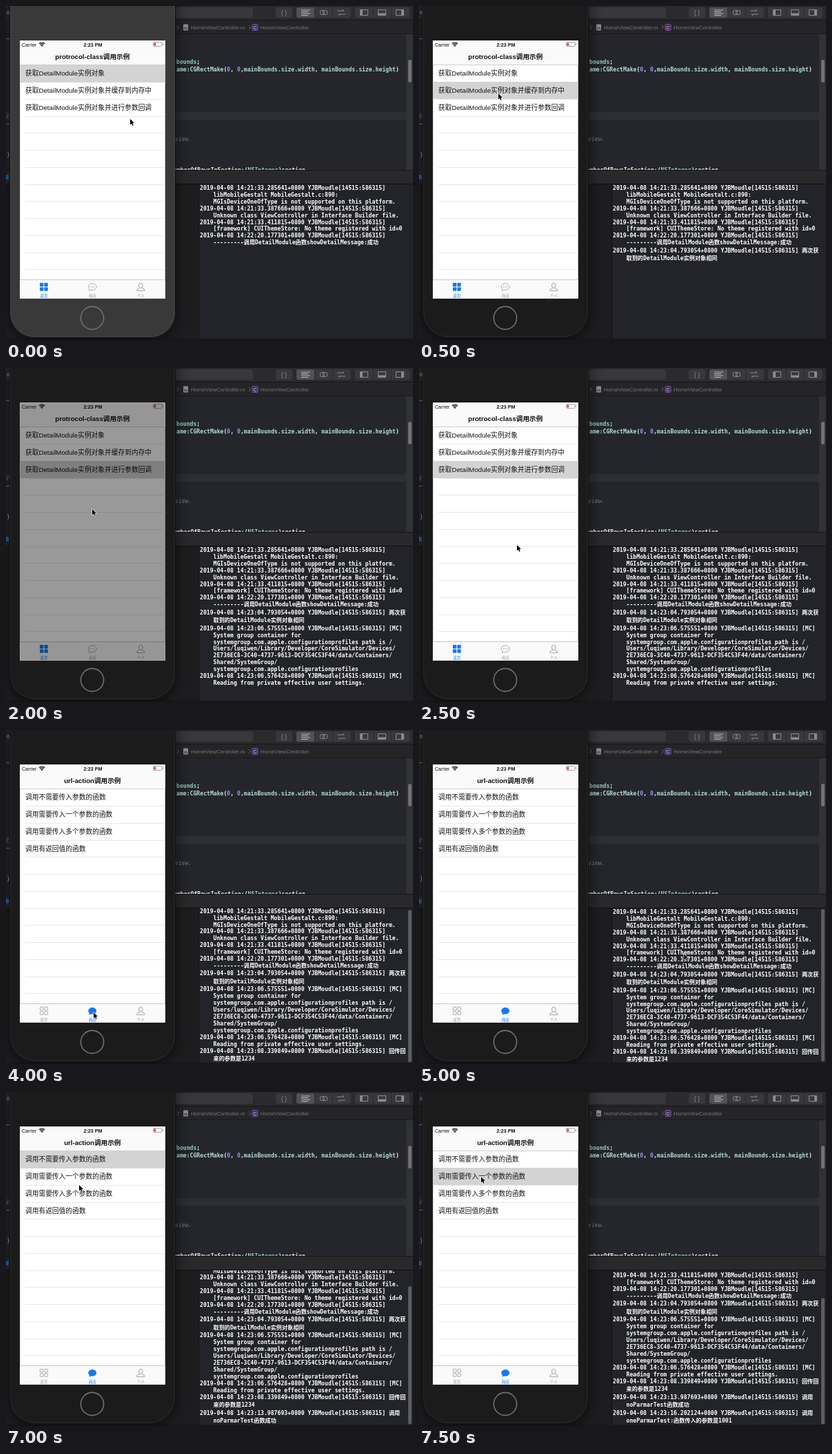
Recreate the animation shown at these times as an HTML page with a canvas. Size 590x485 px, loop 8000 ms.

```html
<!DOCTYPE html>
<html lang="zh-CN">
<head>
<meta charset="utf-8">
<title>Module demo</title>
<style>
html, body { margin: 0; width: 590px; height: 485px; overflow: hidden; background: #1e1e20; }
canvas { display: block; }
</style>
</head>
<body>
<canvas id="stage" width="590" height="485"></canvas>
<script>
const g = document.getElementById('stage').getContext('2d');
const CJK = '"Noto Sans CJK SC", "Noto Sans CJK", ';
const SANS = '"Liberation Sans", ' + CJK + 'sans-serif';
const MONO = '"DejaVu Sans Mono", ' + CJK + 'monospace';
const STEP = 500, LOOP = 8000;
const BLUE = '#1479f5', GREY = '#9a9a9a';

// Console
const stamp = (time, tail = '') => `2019-04-08 14:${time}+0800 YJBMoudle[14515:586315]${tail}`;
const LOG = [
  stamp('21:33.285641'),
  '    libMobileGestalt MobileGestalt.c:890:',
  '    MGIsDeviceOneOfType is not supported on this platform.',
  stamp('21:33.387666'),
  '    Unknown class ViewController in Interface Builder file.',
  stamp('21:33.411815'),
  '    [framework] CUIThemeStore: No theme registered with id=0',
  stamp('22:20.177301'),
  '    ---------调用DetailModule函数showDetailMessage:成功',
  stamp('23:04.793054', ' 两次获'),
  '    取到的DetailModule实例对象相同',
  stamp('23:06.575551', ' [MC]'),
  '    System group container for',
  '    systemgroup.com.apple.configurationprofiles path is /',
  '    Users/luqiwen/Library/Developer/CoreSimulator/Devices/',
  '    2E736EC8-3C40-4737-9613-DCF354C53F44/data/Containers/',
  '    Shared/SystemGroup/',
  '    systemgroup.com.apple.configurationprofiles',
  stamp('23:06.576428', ' [MC]'),
  '    Reading from private effective user settings.',
  stamp('23:08.339849', ' 回传回'),
  '    来的参数是1234',
  stamp('23:13.987693', ' 调用'),
  '    noParmarTest函数成功',
  stamp('23:16.202124', ' 调用'),
  '    oneParmarTest:函数传入的参数是1001'
];

const PAGES = [
  { title: 'protrocol-class调用示例',
    rows: ['获取DetailModule实例对象', '获取DetailModule实例对象并缓存到内存中', '获取DetailModule实例对象并进行参数回调'] },
  { title: 'url-action调用示例',
    rows: ['调用不需要传入参数的函数', '调用需要传入一个参数的函数', '调用需要传入多个参数的函数', '调用有返回值的函数'] }
];

// Each step lists only what changes
const CHANGES = [
  { x: 180, y: 164, page: 0, on: [0], lines: 9, body: '#393939', dim: false, top: false },
  { x: 115, y: 127, on: [1], lines: 11, body: '#1b1b1c' },
  { x: 111, y: 138 },
  { x: 103, y: 148, on: [1, 2] },
  { x: 125, y: 205, on: [2], lines: 20, dim: true },
  { x: 142, y: 257, dim: false },
  { lines: 22 },
  { x: 126, y: 412 },
  { x: 127, y: 410, page: 1, on: [] },
  { x: 386, y: 335 },
  { x: 384, y: 325, top: true },
  { x: 209, y: 202, top: false },
  { x: 122, y: 91, on: [0], lines: 24 },
  { x: 122, y: 101 },
  { x: 106, y: 135 },
  { x: 90, y: 123, on: [1], lines: 26 }
];
const STATES = [];
CHANGES.forEach((c, i) => STATES.push({ ...STATES[i - 1], ...c }));

function box(x, y, w, h, fill) {
  g.fillStyle = fill;
  g.fillRect(x, y, w, h);
}

function round(x, y, w, h, r, fill, stroke, line = 1) {
  g.beginPath();
  g.roundRect(x, y, w, h, r);
  if (fill) { g.fillStyle = fill; g.fill(); }
  if (stroke) { g.strokeStyle = stroke; g.lineWidth = line; g.stroke(); }
}

function path(points, stroke, line = 1) {
  g.beginPath();
  points.forEach(([x, y]) => g.lineTo(x, y));
  g.strokeStyle = stroke;
  g.lineWidth = line;
  g.stroke();
}

function text(str, x, y, font, fill, align = 'left') {
  g.font = font;
  g.fillStyle = fill;
  g.textAlign = align;
  g.fillText(str, x, y);
}

// Runs of [text, colour] set one after another
function code(x, y, runs) {
  for (const [str, fill] of runs) {
    text(str, x, y, 'bold 8.15px ' + MONO, fill);
    x += g.measureText(str).width;
  }
}

function toolbar() {
  const ink = '#8a8a8c', bar = '#2b2b2d', button = '#39393b';
  box(0, 0, 590, 20, bar);
  round(200, 2, 158, 15, 3, '#38383a');
  text('6', 1, 12, '8px ' + SANS, '#a0a0a2');
  round(391, 2, 24, 15, 3, button);
  text('{ }', 403, 12.5, '9px ' + SANS, ink, 'center');
  round(421, 2, 79, 15, 3, button);
  round(421, 2, 26, 15, [3, 0, 0, 3], '#525254');
  round(506, 2, 79, 15, 3, button);
  for (const x of [447, 473, 532, 558]) box(x, 2, 1, 15, bar);
  for (let i = 0; i < 4; i++) box(428, 5.5 + i * 2.5, i % 2 ? 10 : 13, 1, '#b8b8ba');
  g.strokeStyle = ink;
  g.lineWidth = 1;
  for (const x of [458.5, 462.5]) {
    g.beginPath();
    g.arc(x, 9.5, 3.3, 0, 7);
    g.stroke();
  }
  path([[480, 7], [490, 7], [488, 5]], ink);
  path([[492, 12], [482, 12], [484, 14]], ink);
  for (const x of [513.5, 539.5, 565.5]) round(x, 5.5, 11, 8, 0, null, ink);
  box(514, 6, 3, 7, ink);
  box(540, 10.5, 10, 3, ink);
  box(573, 6, 3, 7, ink);
}

function editor() {
  const teal = '#8fcfc0', mint = '#b4ddd3', white = '#ececee', num = '#a08ff5';
  box(0, 20, 590, 1, '#161618');
  box(0, 21, 590, 19, '#252528');
  box(0, 40, 590, 1, '#1a1a1c');
  const crumb = '7.7px ' + SANS, dull = '#77777a';
  for (const x of [248, 352]) path([[x, 28], [x + 2.5, 31], [x, 34]], '#606063');
  round(257, 26.5, 7, 9, 1, '#8e8e91');
  text('m', 260.5, 33.5, 'bold 6px ' + SANS, '#333336', 'center');
  text('HomeViewController.m', 268, 34, crumb, dull);
  round(357, 26.5, 8, 9, 1.5, '#3b2e50', '#7c5cab');
  text('C', 361, 33.7, 'bold 7px ' + SANS, '#b9a3d8', 'center');
  text('HomeViewController', 369, 34, crumb, dull);

  box(0, 41, 580, 198, '#25262b');
  box(0, 154, 580, 11, '#2e2f34');
  box(580, 41, 10, 198, '#313235');
  round(583, 78, 5, 33, 2.5, '#717174');
  code(247, 84, [['bounds', teal], [';', white]]);
  code(247, 95, [
    ['ame:CGRectMake', mint], ['(', white], ['0', num], [', ', white], ['0', num], [',', white],
    ['mainBounds.size.width', mint], [', ', white], ['mainBounds.size.height', mint], [')', white]
  ]);
  text('view.', 245, 196, 'italic 8.15px ' + MONO, '#747c84');
  code(243, 241, [['umberOfRowsInSection:(', white], ['NSInteger', teal], [')section', white]]);

  for (const y of [47, 171]) box(0, y, 5, 1, '#78787b');
  text('r', 0, 163, 'italic 8px ' + MONO, '#77777a');
  text('}', 1, 219, '8px ' + MONO, '#b0b0b2');
}

function debugArea() {
  box(0, 238, 590, 1, '#151517');
  box(0, 239, 590, 19, '#29292b');
  box(0, 258, 590, 1, '#111113');
  round(-4, 245, 8, 7, [0, 3, 3, 0], '#2a62a5');
  box(0, 259, 279, 226, '#1d1d1f');
  box(279, 259, 1, 226, '#111113');
  box(280, 259, 310, 226, '#232429');
}

function consoleLog(s) {
  const top = 259, view = 224.5;
  const rows = [];
  let y = top;
  for (const line of LOG.slice(0, s.lines)) {
    rows.push([line, y]);
    y += /[\u4e00-\u9fff]/.test(line) ? 11.5 : 9.9;
  }
  const full = y - top;
  const scroll = s.top ? 0 : Math.max(0, full - view);
  g.save();
  g.beginPath();
  g.rect(280, top, 310, view);
  g.clip();
  for (const [line, at] of rows) text(line, 281, at - scroll + 8, 'bold 8.15px ' + MONO, '#fff');
  if (full > view) {
    const len = view * view / full;
    round(583, top + scroll * view / full + 1, 5, len - 2, 2.5, '#5c5d60');
  }
  g.restore();
  box(0, 483, 590, 2, '#18181a');
}

function tabIcons(page) {
  const tint = i => i === page ? BLUE : GREY;
  for (let i = 0; i < 4; i++) {
    const x = 49 + i % 2 * 6.4, y = 402 + (i >> 1) * 6.4;
    if (page === 0) round(x, y, 5.4, 5.4, 1, BLUE);
    else round(x + .4, y + .4, 4.6, 4.6, .8, null, GREY, .8);
  }

  g.beginPath();
  g.ellipse(125.2, 407.8, 6, 4.8, 0, 2.35, 2.35 + 5.75);
  g.lineTo(120.5, 413.5);
  g.closePath();
  g.lineWidth = .8;
  g.strokeStyle = g.fillStyle = tint(1);
  if (page === 1) g.fill();
  else {
    g.stroke();
    for (const x of [122, 124.6, 127.2]) box(x, 407.3, 1.2, 1.2, GREY);
  }

  g.strokeStyle = GREY;
  g.lineWidth = .9;
  g.beginPath();
  g.ellipse(195.3, 405.8, 2.9, 3.5, 0, 0, 7);
  g.stroke();
  g.beginPath();
  g.moveTo(193.8, 409);
  g.quadraticCurveTo(193.5, 410.6, 190, 411.3);
  g.lineTo(189.8, 413.6);
  g.lineTo(200.8, 413.6);
  g.lineTo(200.6, 411.3);
  g.quadraticCurveTo(197.1, 410.6, 196.8, 409);
  g.stroke();
  ['首页', '商店', '个人'].forEach((label, i) =>
    text(label, 55 + i * 70.3, 423.2, '5.6px ' + SANS, tint(i), 'center'));
}

function statusBar() {
  text('Carrier', 23, 58.5, '7px ' + SANS, '#111');
  g.strokeStyle = '#111';
  g.lineWidth = 1.1;
  for (const r of [2.2, 4.1, 6]) {
    g.beginPath();
    g.arc(52, 59, r, -2.35, -.79);
    g.stroke();
  }
  box(51.3, 57.5, 1.4, 1.4, '#111');
  text('2:23 PM', 126, 58.6, 'bold 7.2px ' + SANS, '#111', 'center');
  round(213.5, 52.5, 12.5, 6, 1.5, null, '#8e8e8e', .8);
  box(214.6, 53.6, 2.4, 3.8, '#f0252c');
  box(227, 54.4, 1, 2.2, '#8e8e8e');
}

function phone(s) {
  g.save();
  g.shadowColor = 'rgba(0,0,0,.6)';
  g.shadowBlur = 20;
  g.shadowOffsetY = 3;
  round(5, -60, 241, 542, 37, s.body);
  g.restore();
  round(5.5, -60, 240, 541.5, 36.5, null, '#111112');
  round(6.7, -60, 237.6, 540.3, 35.5, null, 'rgba(255,255,255,.07)');
  g.beginPath();
  g.arc(125, 453, 16.6, 0, 7);
  g.strokeStyle = '#707073';
  g.lineWidth = 1.6;
  g.stroke();

  const page = PAGES[s.page], pitch = 24.75;
  g.save();
  g.beginPath();
  g.rect(20.2, 50.3, 210.5, 374.5);
  g.clip();
  box(20, 50, 211, 375, '#fff');
  box(20, 50, 211, 35, '#fafafa');
  box(20, 85, 211, 1, '#cfcfd1');
  for (let i = 1; i < 13; i++) box(28, Math.round(85.3 + i * pitch), 203, 1, '#e8e8ea');
  for (const i of s.on) box(20, Math.round(85.5 + i * pitch), 211, 25, '#d3d3d3');
  page.rows.forEach((row, i) => text(row, 28, 101.4 + i * pitch, '9.72px ' + SANS, '#161616'));
  statusBar();
  text(page.title, 125.3, 76.8, 'bold 9.65px ' + SANS, '#111', 'center');
  box(20, 397, 211, 28, '#fafafa');
  box(20, 397, 211, 1, '#cacacc');
  tabIcons(s.page);
  if (s.dim) box(20, 50, 211, 375, 'rgba(0,0,0,.4)');
  g.restore();
}

function cursor(x, y) {
  const shape = [[0, 0], [0, 8.4], [1.9, 6.7], [3.3, 9.8], [4.7, 9.2], [3.4, 6.2], [5.9, 6]];
  g.beginPath();
  shape.forEach(([dx, dy]) => g.lineTo(x + dx, y + dy));
  g.closePath();
  g.lineJoin = 'round';
  g.lineWidth = 1.2;
  g.strokeStyle = '#fff';
  g.stroke();
  g.fillStyle = '#000';
  g.fill();
}

function draw(s) {
  toolbar();
  editor();
  debugArea();
  consoleLog(s);
  phone(s);
  cursor(s.x, s.y);
}

let start;
function tick(now) {
  start ??= now;
  draw(STATES[Math.floor((now - start) % LOOP / STEP)]);
  requestAnimationFrame(tick);
}
draw(STATES[0]);
requestAnimationFrame(tick);
</script>
</body>
</html>
```
